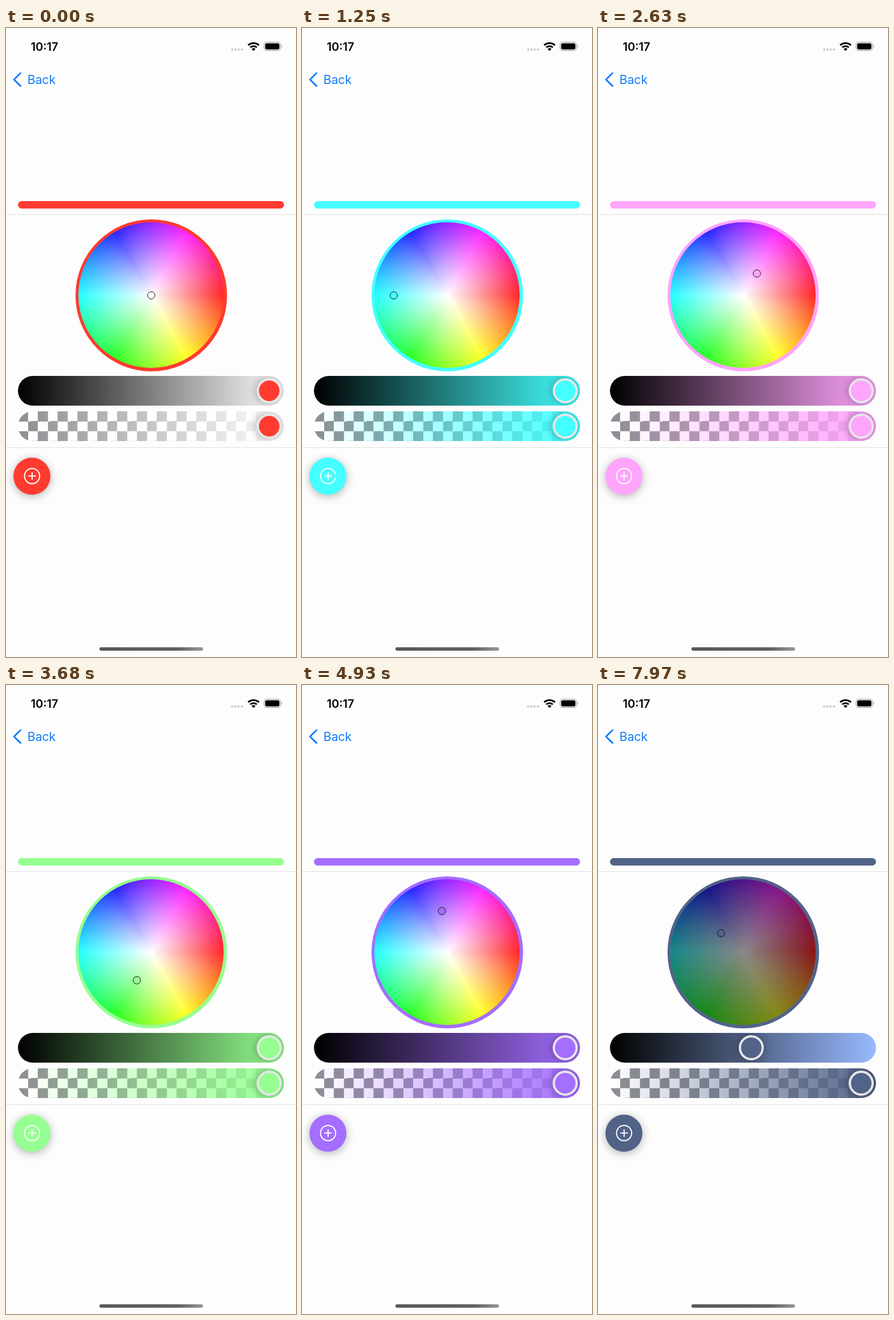
Animation, 509 px wide and 1101 px high, one loop 8 s. Source, as an HTML page:

```html
<!DOCTYPE html>
<html lang="en">
<head>
<meta charset="utf-8">
<title>Color picker</title>
<style>
  html, body { margin: 0; width: 100%; height: 100%; overflow: hidden; background: #fdfdfd; }
  #stage { position: absolute; left: 0; top: 0; width: 509px; height: 1101px; overflow: hidden; }
  #stage div, svg { position: absolute; box-sizing: border-box; }
  svg { left: 0; top: 0; }
  text { font-family: Inter, "Open Sans", sans-serif; }

  .swatch { left: 21px; top: 303px; width: 467px; height: 13px; border-radius: 7px; background: var(--tint); }
  .rule { left: 0; width: 509px; height: 1px; background: #dedee0; }

  .ring { left: 121.5px; top: 334.5px; width: 266px; height: 266px; border-radius: 50%; background: var(--tint); }
  .wheel {
    inset: 5.5px; border-radius: 50%;
    background:
      radial-gradient(closest-side, #fff, rgba(255, 255, 255, .15)),
      conic-gradient(from 90deg, #f00, #ff0, #0f0, #0ff, #00f, #f0f, #f00);
  }
  .shade { inset: 5.5px; border-radius: 50%; background: #000; opacity: calc(1 - var(--value)); }
  .marker {
    left: 247.5px; top: 460.5px; width: 14px; height: 14px; border-radius: 50%;
    border: 1.7px solid #111; background: var(--mix);
    transform: translate(var(--dx), var(--dy));
  }

  .slider { left: 21px; width: 467px; height: 52px; border-radius: 26px; overflow: hidden; }
  .bright { top: 609px; background: linear-gradient(90deg, #000, var(--base)); }
  .alpha {
    top: 671.2px;
    background:
      linear-gradient(90deg, transparent, var(--mix)),
      conic-gradient(#fff 25%, #8e8e93 0 50%, #fff 0 75%, #8e8e93 0) 0 0 / 34.8px 34.8px;
  }
  .thumb {
    left: 419px; top: 4px; width: 44px; height: 44px; border-radius: 50%;
    border: 4px solid #e6e6e8; background: var(--tint);
    box-shadow: 0 0 18px rgba(0, 0, 0, .36);
  }
  .bright .thumb { left: calc(4px + 415px * var(--value)); }

  .tray { left: 0; top: 745px; width: 509px; height: 110px; overflow: hidden; }
  .add {
    left: 13px; top: 6.5px; width: 65px; height: 65px; border-radius: 50%;
    background: var(--tint); box-shadow: 0 3px 16px rgba(0, 0, 0, .3);
  }
  .home {
    left: 164px; top: 1084px; width: 182px; height: 6px; border-radius: 3px;
    background: linear-gradient(90deg, #5c585b, #625f61 75%, #9a989c);
  }
</style>
</head>
<body>
<div id="stage">
  <div class="swatch"></div>
  <div class="rule" style="top:326px"></div>
  <div class="ring"><div class="wheel"></div><div class="shade"></div></div>
  <div class="marker"></div>
  <div class="slider bright"><div class="thumb"></div></div>
  <div class="slider alpha"><div class="thumb"></div></div>
  <div class="rule" style="top:734px"></div>
  <div class="tray"><div class="add"></div></div>
  <div class="home"></div>

  <svg width="509" height="1101" fill="none">
    <text x="67.5" y="39.6" font-size="20" font-weight="600" text-anchor="middle" fill="#000">10:17</text>
    <g fill="#d2d2d4">
      <circle cx="397" cy="37.7" r="2.3"/><circle cx="402.7" cy="37.7" r="2.3"/>
      <circle cx="408.4" cy="37.7" r="2.3"/><circle cx="414.1" cy="37.7" r="2.3"/>
    </g>
    <g stroke="#000" stroke-width="3.1">
      <path d="M425.1 30.2a13.6 13.6 0 0 1 18.8 0"/>
      <path d="M428.8 34a8.2 8.2 0 0 1 11.4 0"/>
    </g>
    <path d="M434.5 40.2l-3.4-3.5a4.9 4.9 0 0 1 6.8 0z" fill="#000"/>
    <rect x="453" y="24.8" width="28.8" height="14.6" rx="4.4" stroke="#98989a" stroke-width="1.1"/>
    <rect x="454.9" y="26.7" width="25" height="10.8" rx="2.7" fill="#000"/>
    <path d="M483.3 29.7q3 2.4 0 4.8z" fill="#98989a"/>
    <path d="M25.4 79L14 90.2l11.4 11.2" stroke="#157efb" stroke-width="2.9" stroke-linecap="round" stroke-linejoin="round"/>
    <text x="37.6" y="98" font-size="21.5" letter-spacing="-.2" fill="#157efb">Back</text>
    <g stroke="#fff" stroke-width="2" stroke-linecap="round">
      <circle cx="45.8" cy="784.3" r="13.3"/>
      <path d="M39.9 784.3h11.8M45.8 778.4v11.8"/>
    </g>
  </svg>
</div>

<script>
  const LOOP = 8000, RADIUS = 128, DIM_AT = 7970;
  // Moments at which the screen refreshes; it holds still in between.
  const ticks = [0, 590, 990, 1250, 1580, 1840, 2170, 2370, 2630, 3090,
                 3680, 4010, 4470, 4930, 5330, 5660, 5990, 7970];
  // Finger path: time, angle in degrees (clockwise from right), distance.
  const path = [[0, 180, 0], [1250, 180, 94], [2630, 302, 45],
                [3680, 477.5, 55], [4930, 262.5, 73], [5990, 220.7, 51.3]];
  const root = document.documentElement.style;

  function fingerAt(t) {
    const i = path.findIndex(p => p[0] > t);
    if (i < 0) return path[path.length - 1].slice(1);
    const a = path[i - 1], b = path[i];
    const k = (t - a[0]) / (b[0] - a[0]);
    return [a[1] + (b[1] - a[1]) * k, a[2] + (b[2] - a[2]) * k];
  }

  function hsv(hue, sat, value) {
    const channel = n => {
      const k = (n + hue / 60) % 6;
      return Math.round(255 * value * (1 - sat * Math.max(0, Math.min(k, 4 - k, 1))));
    };
    return `rgb(${channel(5)}, ${channel(3)}, ${channel(1)})`;
  }

  function draw(t) {
    const [angle, dist] = fingerAt(t);
    const rad = angle * Math.PI / 180;
    const value = t >= DIM_AT ? 0.535 : 1;
    const mix = hsv(angle, dist / RADIUS, value);
    const vars = {
      base: hsv(angle, dist / RADIUS, 1),
      mix,
      tint: t === 0 ? '#ff3b30' : mix,
      value,
      dx: Math.cos(rad) * dist + 'px',
      dy: Math.sin(rad) * dist + 'px'
    };
    for (const name in vars) root.setProperty('--' + name, vars[name]);
  }

  let shown = -1;
  const start = performance.now();
  function frame() {
    const now = (performance.now() - start) % LOOP;
    const tick = ticks.filter(t => t <= now).pop();
    if (tick !== shown) draw(shown = tick);
    requestAnimationFrame(frame);
  }
  frame();
</script>
</body>
</html>
```
